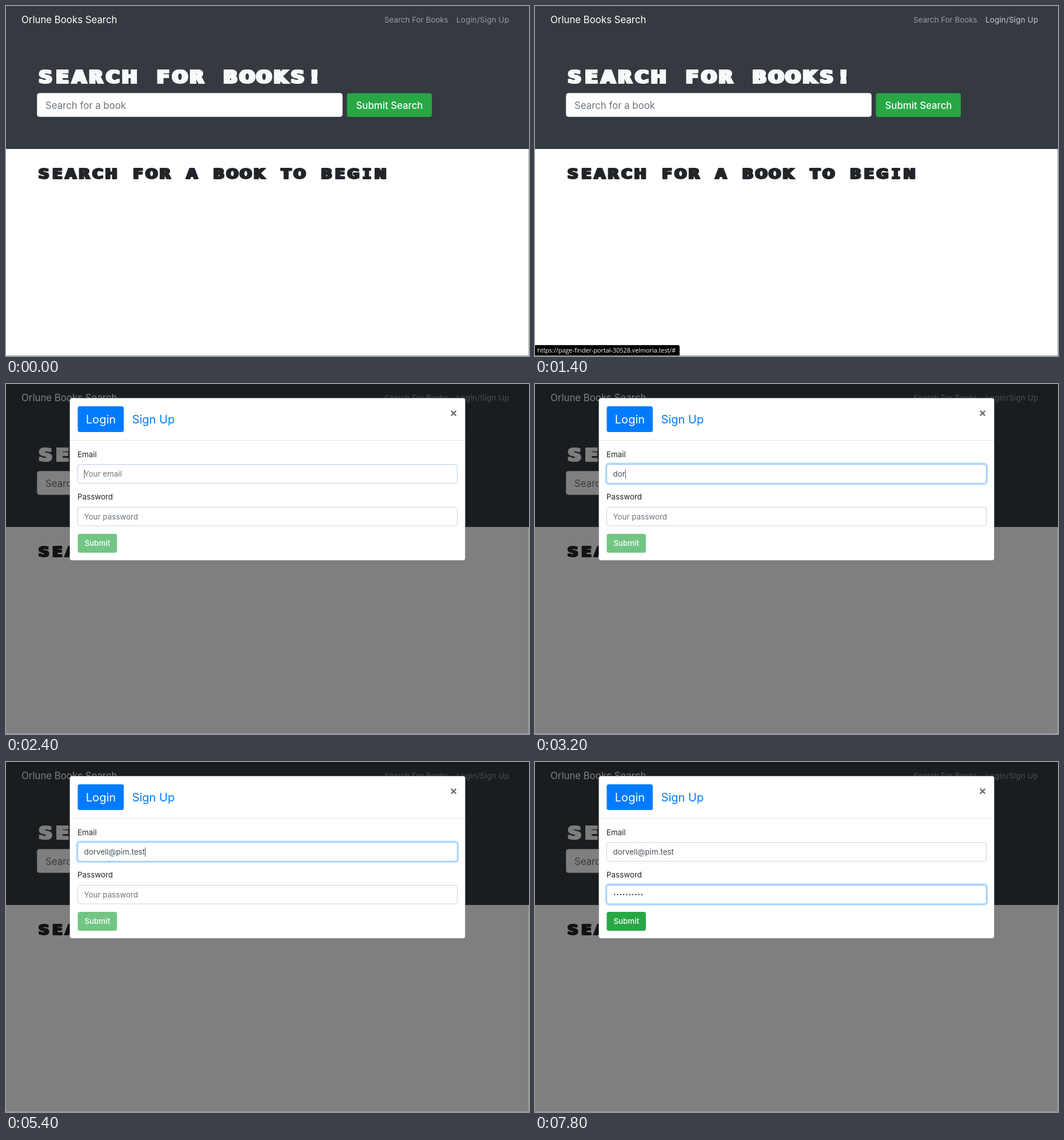
An HTML page that plays this animation: 915x612 px, repeating every 8000 ms.

```html
<!DOCTYPE html>
<html lang="en">
<head>
<meta charset="utf-8">
<title>Book search</title>
<style>
  html, body { margin: 0; width: 100%; height: 100%; overflow: hidden; background: #fff; }
  svg { display: block; width: 915px; height: 612px; font: 13.4px Inter, Roboto, sans-serif; }
  .large { font-size: 16.8px; }
  .tab { font-size: 20.1px; }
  .mid { text-anchor: middle; }
  .medium { font-weight: 500; }
  .white { fill: #fff; }
  .ink { fill: #212529; }
  .blue { fill: #007bff; }
  .green { fill: #28a745; }
  .hint { fill: #6c757d; }
  .typed { fill: #495057; }
  .link { fill: rgba(255, 255, 255, .5); }
  .link.hover { fill: rgba(255, 255, 255, .75); }
  #login { letter-spacing: .2px; }
  .heading { font-family: "DejaVu Sans", Verdana, sans-serif; font-weight: 700; text-anchor: middle; }
  .heading .slab { font-family: "DejaVu Sans Mono", monospace; }
  #title { font-size: 31.8px; fill: #f8f9fa; stroke: #f8f9fa; stroke-width: 1.8; }
  #prompt { font-size: 25px; fill: #212529; stroke: #212529; stroke-width: 1.4; }
  .box { fill: #fff; stroke: #ced4da; }
  .ring { fill: none; stroke: rgba(0, 123, 255, .25); stroke-width: 3; visibility: hidden; }
  .focus .ring { visibility: visible; }
  .focus .box { stroke: #80bdff; }
  .focusing .box { stroke: #b9cde6; }
  .dots { font: 9px "DejaVu Sans", sans-serif; }
  .close { font-weight: 700; fill: rgba(0, 0, 0, .55); }
  .status { font: 10.8px "Open Sans", "Noto Sans", sans-serif; }
</style>
</head>
<body>
<svg viewBox="0 0 915 612">
  <rect width="915" height="250" fill="#343a40"/>
  <text class="large white" x="27" y="30">Orlune Books Search</text>
  <text class="link" x="662" y="28.5">Search For Books</text>
  <text class="link" id="login" x="788" y="28.5">Login/Sign Up</text>

  <!-- Shifted copies broaden the heading letters. -->
  <text class="heading" id="title" data-text="SEARCH FOR BOOKS!" data-pitch="29.4" y="134.5"></text>
  <use href="#title" x="-1.7"/>
  <use href="#title" x="1.7"/>
  <rect class="box" x="54.5" y="152.5" width="534" height="41" rx="4"/>
  <text class="large hint" x="69" y="179.5">Search for a book</text>
  <rect class="green" x="596.5" y="152.5" width="148.5" height="41.5" rx="4"/>
  <text class="large white mid medium" x="671" y="179.5">Submit Search</text>
  <text class="heading" id="prompt" data-text="SEARCH FOR A BOOK TO BEGIN" data-pitch="23.55" y="301.8"></text>
  <use href="#prompt" x="-1.4"/>
  <use href="#prompt" x="1.4"/>

  <g id="dialog">
    <rect width="915" height="612" opacity=".5"/>
    <g id="modal">
      <rect x="111.5" y="24.5" width="692" height="284" rx="4" fill="#fff" stroke="rgba(0,0,0,.2)"/>
      <rect class="blue" x="125.5" y="39" width="80.5" height="45" rx="3.5"/>
      <text class="tab white mid" x="166" y="69">Login</text>
      <text class="tab blue" x="220.5" y="69">Sign Up</text>
      <text class="tab close mid" x="783" y="57.3">×</text>
      <rect x="112" y="98" width="691" height="1" fill="#dee2e6"/>

      <text class="ink" x="125" y="127.5">Email</text>
      <g id="email">
        <rect class="ring" x="124" y="139" width="667" height="36" rx="5"/>
        <rect class="box" x="125.5" y="140.5" width="664" height="33" rx="3.5"/>
        <text class="hint" x="136.5" y="162">Your email</text>
        <text class="typed" x="136.5" y="162"></text>
      </g>

      <text class="ink" x="125" y="202">Password</text>
      <g id="password">
        <rect class="ring" x="124" y="213.5" width="667" height="36" rx="5"/>
        <rect class="box" x="125.5" y="215.5" width="664" height="32.5" rx="3.5"/>
        <text class="hint" x="136.5" y="236.5">Your password</text>
        <text class="typed dots" x="136.5" y="235.4"></text>
      </g>

      <rect id="caret" class="typed" width="1" height="16"/>
      <g id="submit">
        <rect class="green" x="125.5" y="262" width="68.5" height="33" rx="3.5"/>
        <text class="white mid medium" x="159.8" y="283">Submit</text>
      </g>
    </g>
  </g>

  <path d="M914.5 250V611.5H0" fill="none" stroke="#a4a7ad"/>
  <g id="status">
    <path d="M0 593H250a3 3 0 0 1 3 3V611H0Z"/>
    <text class="status white" x="4" y="606">https://page-finder-portal-30528.velmoria.test/#</text>
  </g>
</svg>
<script>
  const LOOP = 8000, STEP = 200;
  const ADDRESS = "dorvell@pim.test";
  const HOVER = 800, OPEN = 1600, LEAVE = 2000;
  const EMAIL_FOCUS = 2400, EMAIL_TYPING = 2600, KEY_TIME = 175;
  const PASSWORD_FOCUS = 5600, LAST_KEY = 7200;

  const byId = id => document.getElementById(id);
  const show = (el, on) => { el.style.display = on ? "" : "none"; };
  const clamp = (v, max) => Math.max(0, Math.min(max, v));

  // Headings sit on a fixed-width character grid.
  for (const heading of document.querySelectorAll(".heading")) {
    const { text, pitch } = heading.dataset;
    [...text].forEach((char, i) => {
      if (char === " ") return;
      const cell = document.createElementNS(heading.namespaceURI, "tspan");
      cell.setAttribute("x", 54.5 + (i + .5) * pitch);
      cell.textContent = char;
      if (char === "I") cell.classList.add("slab");
      heading.append(cell);
    });
  }

  function setField(id, value, state) {
    const field = byId(id);
    const typed = field.querySelector(".typed");
    field.setAttribute("class", state);
    show(field.querySelector(".hint"), !value);
    if (typed.textContent !== value) typed.textContent = value;
    return value ? typed.getComputedTextLength() : 0;
  }

  // Two keys per step, a short pause, then one key per step.
  function passwordLength(t) {
    if (t < 6000) return t < 5800 ? 0 : 1;
    if (t < 7000) return Math.min(8, 2 + (t - 6000) / 100);
    return t < LAST_KEY ? 9 : 10;
  }

  function draw(t) {
    const hovering = t >= HOVER && t < LEAVE;
    byId("login").classList.toggle("hover", hovering);
    show(byId("status"), hovering);
    show(byId("dialog"), t >= OPEN);
    if (t < OPEN) return;

    byId("modal").setAttribute("transform", `translate(0 ${t < OPEN + STEP ? -9 : 0})`);
    const inPassword = t >= PASSWORD_FOCUS;
    const keys = clamp(Math.floor((t - EMAIL_TYPING) / KEY_TIME), ADDRESS.length);
    const dots = passwordLength(t);
    const emailState = inPassword || t < EMAIL_FOCUS ? ""
      : t < EMAIL_FOCUS + STEP ? "focusing" : "focus";
    const emailWidth = setField("email", ADDRESS.slice(0, keys), emailState);
    const passwordWidth = setField("password", "•".repeat(dots), inPassword ? "focus" : "");

    const blinkedOff = t > LAST_KEY + 500;
    show(byId("caret"), t >= EMAIL_FOCUS && !blinkedOff);
    byId("caret").setAttribute("x", 136.5 + (inPassword ? passwordWidth : emailWidth));
    byId("caret").setAttribute("y", inPassword ? 224 : 149.5);
    byId("submit").setAttribute("opacity", dots ? 1 : .65);
  }

  function tick() {
    draw(Math.floor(performance.now() % LOOP / STEP) * STEP);
    requestAnimationFrame(tick);
  }
  tick();
</script>
</body>
</html>
```
